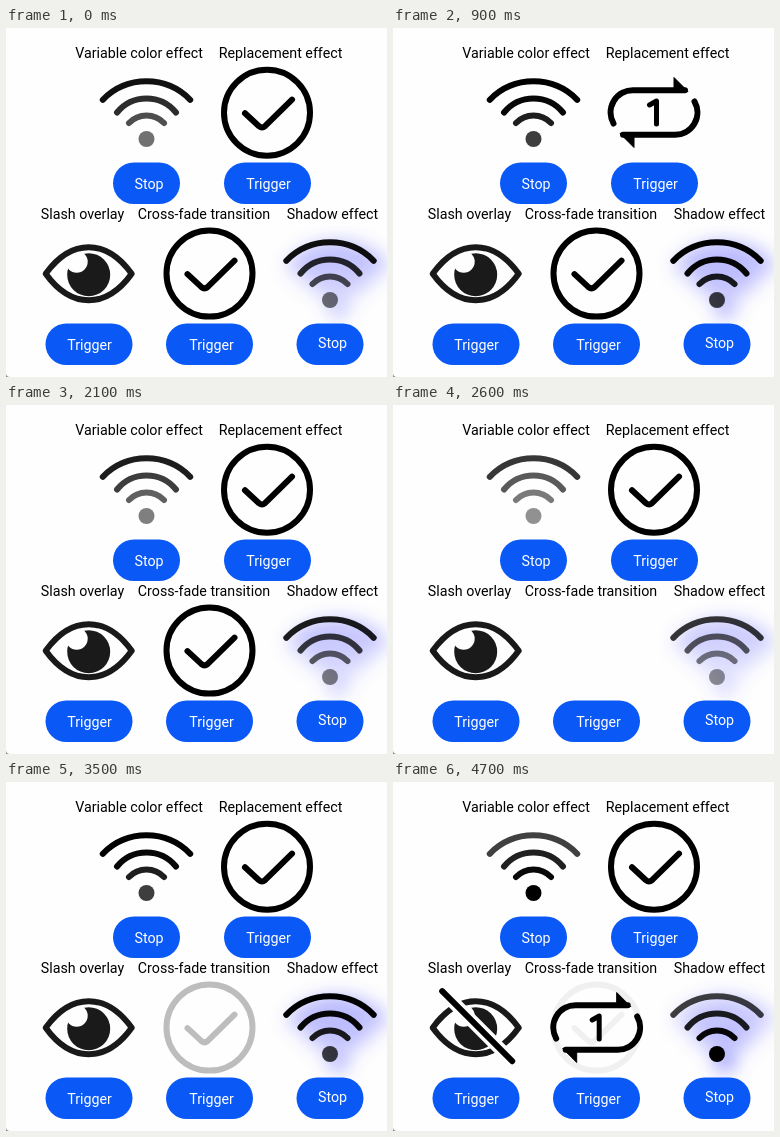
These frames come from a looping animation (381 px wide and 349 px high, 5 s). An HTML page:

```html
<!DOCTYPE html>
<html lang="en">
<head>
<meta charset="utf-8">
<style>
  html, body { margin: 0; width: 100%; height: 100%; overflow: hidden; background: #fefefe; }
  svg { display: block; }
  text { font: 14.25px Roboto, "Noto Sans", sans-serif; text-anchor: middle; }
  .line { fill: none; stroke: #000; stroke-width: 6; stroke-linecap: round; stroke-linejoin: round; }
  .glow { filter: drop-shadow(8px 7px 10px rgba(40, 40, 255, .9)); }
</style>
</head>
<body>
<svg id="stage" width="381" height="349" viewBox="0 0 381 349">
  <defs>
    <g id="check" class="line">
      <circle r="43"/>
      <path d="M-22 .5 L-8 13.5 Q-5 16 -2 13.5 L25 -13"/>
    </g>
    <g id="repeat">
      <g id="half">
        <path class="line" d="M-40.5 11 A22.3 22.3 0 0 1 -21 -22.3 H31"/>
        <path d="M20 -35 L34 -21 H20 Z" stroke="#000" stroke-linejoin="round"/>
      </g>
      <use href="#half" transform="rotate(180)"/>
      <path class="line" style="stroke-width:5" d="M-4.5 -7.5 L2.5 -11.5 V11.5"/>
    </g>
  </defs>
  <path d="M0 345 Q0 349 4 349 H0 Z" fill="#888"/>
  <g transform="translate(82.7 245.7)">
    <circle cy="1" r="21.5" fill="#1a1a1a"/>
    <circle cx="-12" cy="-12" r="11" fill="#fefefe"/>
    <path class="line" stroke-opacity=".9" d="M-43 0 C-30 -18 -15 -26.5 0 -26.5 S30 -18 43 0 C30 18 15 26.5 0 26.5 S-30 18 -43 0 Z"/>
    <g id="slash" transform="translate(1.5 -1.5)">
      <path class="line" style="stroke:#fefefe;stroke-width:13"/>
      <path class="line"/>
    </g>
  </g>
</svg>
<script>
const LOOP = 5000, STEP = 100;
const stage = document.getElementById('stage');
const slash = document.getElementById('slash');
const add = html => stage.insertAdjacentHTML('beforeend', html);

const label = (x, y, text, fill = '#000') => add(`<text x="${x}" y="${y}" fill="${fill}">${text}</text>`);
const button = (x, y, w, text, textX, textY) => {
  add(`<rect x="${x}" y="${y}" width="${w}" height="41.5" rx="20.75" fill="#0a59f7"/>`);
  label(textX, textY, text, '#fff');
};
const icon = (name, x, y) => {
  add(`<use href="#${name}"/>`);
  const el = stage.lastElementChild;
  return (alpha, scale = 1) => {
    el.setAttribute('opacity', alpha);
    el.setAttribute('transform', `translate(${x} ${y}) scale(${scale})`);
  };
};
// Parts run from the dot to the outer arc
const wifi = (x, y, cls) => {
  add(`<g class="${cls}"><g transform="translate(${x} ${y})">
    <circle r="8"/>
    <path class="line" d="M-17.5 -16 A24 24 0 0 1 17.5 -16"/>
    <path class="line" d="M-29.5 -26.5 A38 38 0 0 1 29.5 -26.5"/>
    <path class="line" d="M-43.7 -39.2 A61 61 0 0 1 43.7 -39.2"/></g></g>`);
  return [...stage.lastElementChild.firstElementChild.children];
};

const signals = [wifi(140.5, 111, ''), wifi(324, 272, 'glow')];
const check1 = icon('check', 261, 84.7), repeat1 = icon('repeat', 261, 84.5);
const check2 = icon('check', 203.5, 245.6), repeat2 = icon('repeat', 203.7, 245.5);

label(133, 30, 'Variable color effect');
label(274.5, 30, 'Replacement effect');
label(76.5, 191, 'Slash overlay');
label(198, 191, 'Cross-fade transition');
label(326.5, 191, 'Shadow effect');
button(107, 134.5, 67, 'Stop', 143, 161);
button(218, 134.5, 87, 'Trigger', 262.5, 161);
button(39.5, 295.5, 87, 'Trigger', 83.5, 322);
button(160, 295.5, 87, 'Trigger', 205.5, 322);
button(290.5, 295.5, 67, 'Stop', 326.5, 320);

const clamp = v => Math.min(1, Math.max(0, v));
const ramp = (t, from, to) => clamp((t - from) / (to - from));

// Turns of the colour wave: two quick sweeps, each followed by a slow drift
const turns = t => .33 + .89 * ramp(t, 0, 900) + .21 * ramp(t, 900, 2600)
  + .79 * ramp(t, 2600, 3500) + .22 * ramp(t, 3500, 4200) + .56 * ramp(t, 4200, 4700);

function draw(time) {
  const t = Math.floor(time % LOOP / STEP) * STEP;

  // Each part trails the one below it
  for (const parts of signals) parts.forEach((part, i) =>
    part.setAttribute('opacity', .7 + .3 * Math.cos(2 * Math.PI * (turns(t) - i * .075))));

  const swap = ramp(t, 600, 900) - ramp(t, 1400, 1600);
  check1(clamp(1 - 1.5 * swap), 1 - .4 * swap);
  repeat1(clamp(1.5 * swap - .5), .6 + .4 * swap);

  const shown = 1 - ramp(t, 2100, 2500) + ramp(t, 3400, 3800);
  const fade = ramp(t, 3900, 4600);
  check2(shown * (1 - .95 * fade));
  repeat2(fade);

  const cut = ramp(t, 3800, 4100);
  const end = -35 + 70 * cut;
  slash.setAttribute('display', cut ? 'inline' : 'none');
  for (const path of slash.children) path.setAttribute('d', `M-35 -35 L${end} ${end}`);

  requestAnimationFrame(now => draw(Math.max(0, now - start)));
}
const start = performance.now();
draw(0);
</script>
</body>
</html>
```
